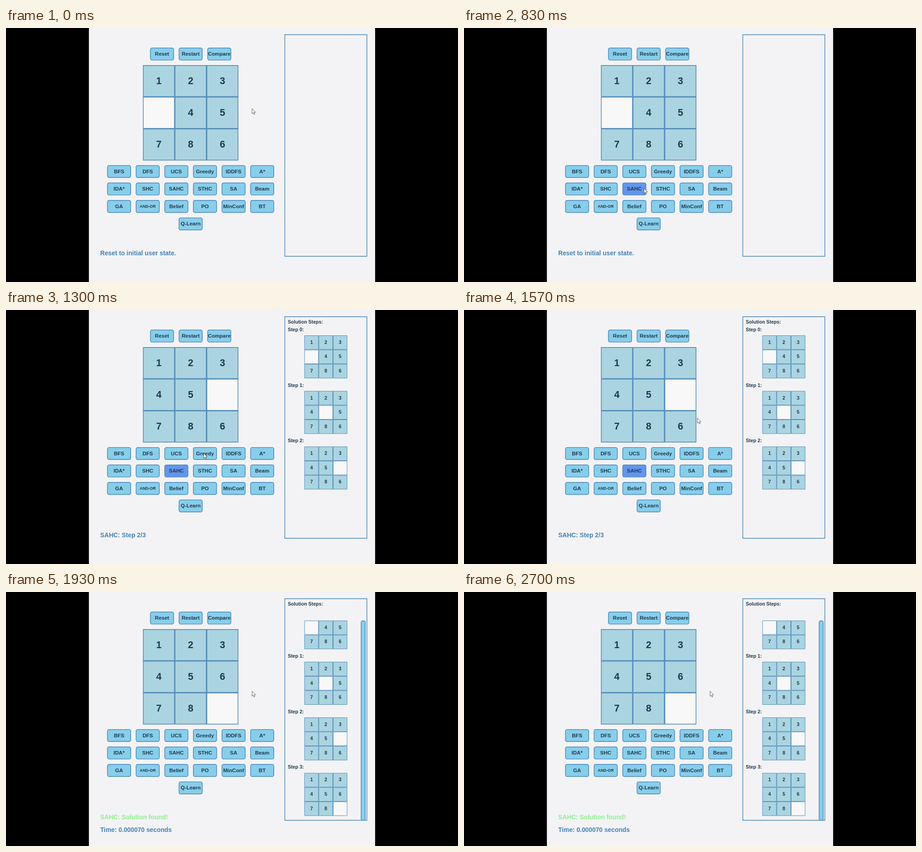
These frames come from a looping animation (998x561 px, 2900 ms). An HTML page with a canvas:

```html
<!DOCTYPE html>
<html lang="en">
<head>
<meta charset="utf-8">
<title>Sliding puzzle solver</title>
<style>
  html, body { margin: 0; width: 100%; height: 100%; overflow: hidden; background: #000; }
  canvas { display: block; }
</style>
</head>
<body>
<canvas id="stage" width="998" height="561"></canvas>
<script>
const ctx = document.getElementById('stage').getContext('2d');
const LEFT = 183, WIDTH = 632, HEIGHT = 561;   // a 900 x 800 window, centred on the stage
const LOOP = 2900, FPS = 30;
const BLUE = '#4682b4', SKY = '#87ceeb', ACTIVE = '#6495ed', TILE = '#abd4e1';
const INK = '#20394b', GREEN = '#90ee90', PAPER = '#f3f3f5', EMPTY = '#f8f8f9';

const BOARDS = ['123045786', '123405786', '123450786', '123456780'];
const STEP_TICKS = [30, 39, 48];
const PRESS_TICK = 22, DONE_TICK = 58;
const ROWS = [
  [62, 'Reset Restart Compare'],
  [432, 'BFS DFS UCS Greedy IDDFS A*'],
  [487, 'IDA* SHC SAHC STHC SA Beam'],
  [542, 'GA AND-OR Belief PO MinConf BT'],
  [597, 'Q-Learn']
];
// tick, x, y of the pointer tip in stage pixels
const POINTER = [
  [0, 543, 178], [11, 543, 178], [16, 416, 260], [19, 399, 335], [22, 397, 354],
  [33, 397, 354], [39, 436, 316], [48, 525, 229], [52, 543, 219], [87, 543, 219]
];

function scaleToWindow() {
  ctx.scale(WIDTH / 900, HEIGHT / 800);
}

function text(str, x, y, size, color = INK, align = 'left') {
  ctx.font = `bold ${size}px "Liberation Sans", Arial, sans-serif`;
  ctx.textAlign = align;
  ctx.fillStyle = color;
  ctx.fillText(str, x, y + size * 0.35);
}

function box(x, y, w, h, fill, line = 2, radius = 0) {
  ctx.beginPath();
  ctx.roundRect(x + line / 2, y + line / 2, w - line, h - line, radius);
  ctx.fillStyle = fill;
  ctx.fill();
  ctx.strokeStyle = BLUE;
  ctx.lineWidth = line;
  ctx.stroke();
}

function board(state, x, y, cell, size, line) {
  [...state].forEach((digit, i) => {
    const cx = x + i % 3 * cell, cy = y + Math.floor(i / 3) * cell;
    if (cy < 80) return;   // rows scrolled under the heading
    box(cx, cy, cell, cell, digit === '0' ? EMPTY : TILE, line);
    if (digit !== '0') text(digit, cx + cell / 2, cy + cell / 2 - 1, size, INK, 'center');
  });
}

function buttons(active) {
  for (const [y, labels] of ROWS) {
    const names = labels.split(' ');
    const x0 = 320 - (names.length * 90 - 15) / 2;
    names.forEach((name, i) => {
      const x = x0 + i * 90;
      box(x, y, 75, 40, name === active ? ACTIVE : SKY, 2, 5);
      text(name, x + 37.5, y + 19.5, name === 'AND-OR' ? 12.5 : 16.4, INK, 'center');
    });
  }
}

function history(step) {
  box(615, 20, 260, 700, PAPER);
  if (!step) return;
  text('Solution Steps:', 625.5, 37, 15.1);
  const scroll = step === 3 ? 35 : 0;
  for (let i = 0; i <= step; i++) {
    const y = 80 + i * 175 - scroll;
    if (y >= 80) text(`Step ${i}:`, 625.5, y - 18.5, 15.1);
    board(BOARDS[i], 677.5, y, 45, 15, 1.3);
  }
  if (scroll) box(855, 90, 15, 630, SKY, 2, 5);
}

function pointer(tick) {
  const i = Math.max(1, POINTER.findIndex(p => p[0] >= tick));
  const [t0, x0, y0] = POINTER[i - 1], [t1, x1, y1] = POINTER[i];
  const k = (tick - t0) / (t1 - t0);
  ctx.save();
  ctx.translate(x0 + (x1 - x0) * k, y0 + (y1 - y0) * k);
  scaleToWindow();
  const arrow = new Path2D('M.5 0V16L4 12.7 6.5 18.5 9 17.4 6.6 11.8H11.5Z');
  ctx.fillStyle = '#fff';
  ctx.fill(arrow);
  ctx.strokeStyle = '#222';
  ctx.lineWidth = 1;
  ctx.stroke(arrow);
  ctx.restore();
}

function draw(ms) {
  const tick = Math.floor((ms % LOOP + 5) * FPS / 1000);
  const step = STEP_TICKS.filter(t => tick >= t).length;
  const done = tick >= DONE_TICK;

  ctx.fillStyle = '#000';
  ctx.fillRect(0, 0, 998, HEIGHT);
  ctx.fillStyle = PAPER;
  ctx.fillRect(LEFT, 0, WIDTH, HEIGHT);

  ctx.save();
  ctx.translate(LEFT, 0);
  scaleToWindow();
  board(BOARDS[step], 170, 117, 100, 30.5, 2);
  buttons(tick >= PRESS_TICK && !done ? 'SAHC' : '');
  history(step);
  if (done) {
    text('SAHC: Solution found!', 35.5, 709, 19.7, GREEN);
    text('Time: 0.000070 seconds', 35.5, 749, 19.7, BLUE);
  } else {
    text(step ? `SAHC: Step ${step}/3` : 'Reset to initial user state.', 35.5, 709, 19.7, BLUE);
  }
  ctx.restore();
  pointer(tick);
}

const start = performance.now();
function loop() {
  draw(performance.now() - start);
  requestAnimationFrame(loop);
}
loop();
</script>
</body>
</html>
```
